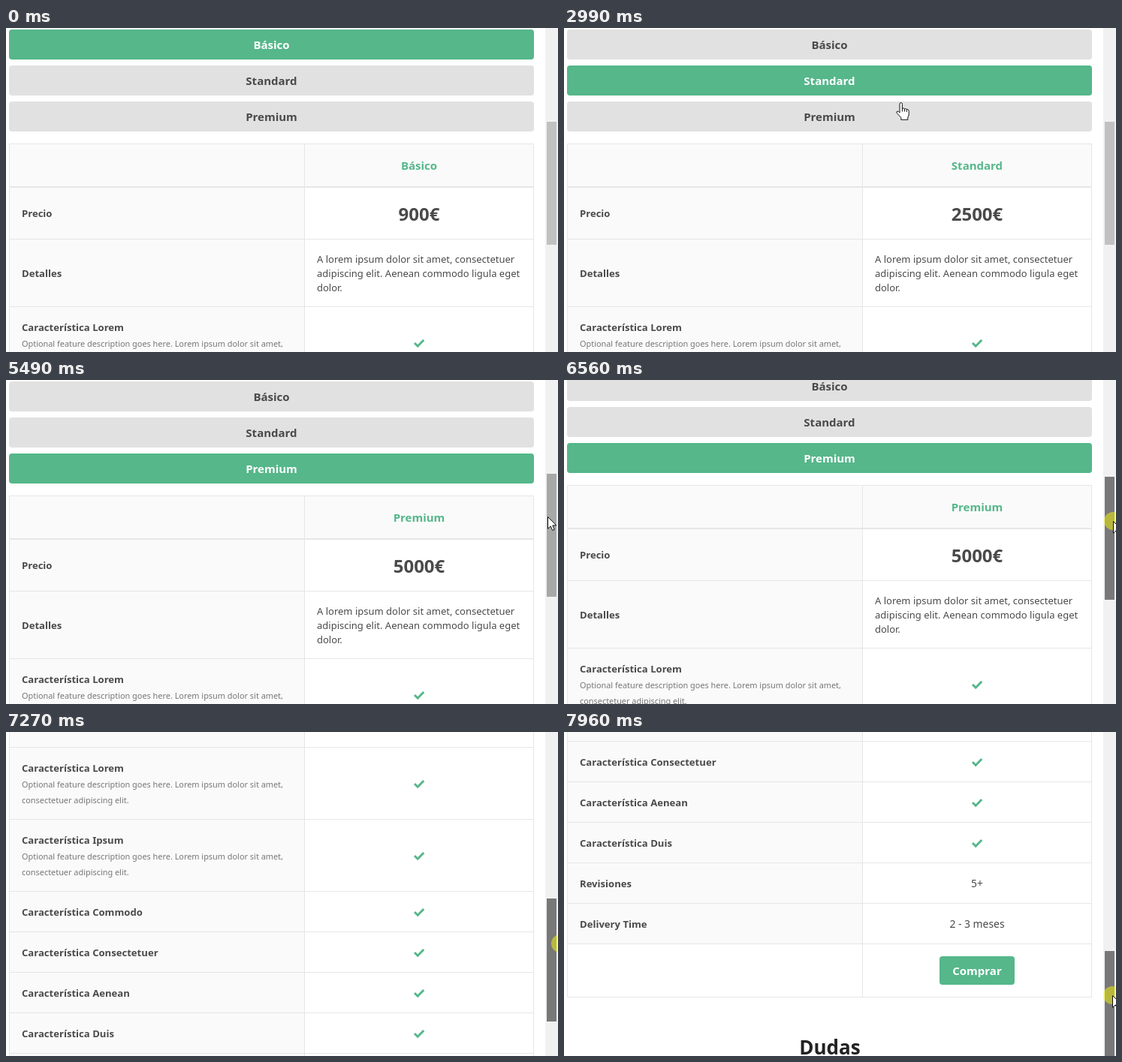
An HTML page for the animation above (8000 ms loop, 735x432 px).

```html
<!DOCTYPE html>
<html lang="es">
<head>
<meta charset="utf-8">
<title>Planes</title>
<style>
  html, body { margin: 0; width: 100%; height: 100%; overflow: hidden; background: #fff; }
  svg { display: block; font-family: "Noto Sans", sans-serif; fill: #4a4a4a; }
  .b { font-weight: 700; }
  .mid { text-anchor: middle; }
  .tab { font-size: 15px; }
  .price { font-size: 24px; }
  .row { font-size: 13.1px; }
  .text { font-size: 13px; }
  .value { font-size: 13.9px; }
  .note { font-size: 10.9px; fill: #777; }
  .green { fill: #55b78a; }
  .white { fill: #fff; }
  .title { font-size: 26px; fill: #222; }
  .cell { fill: #fafafa; }
  .line { fill: #e6e6e6; }
  .tick { fill: none; stroke: #55b78a; stroke-width: 3; }
  .cursor { fill: #fff; stroke: #111; stroke-width: 1; stroke-linejoin: round; }
</style>
</head>
<body>
<svg width="735" height="432" viewBox="0 0 735 432">
  <g id="page"></g>
  <rect x="718" width="17" height="432" fill="#f1f1f1"/>
  <rect id="thumb" x="720" width="13" height="164"/>
  <g id="pointer">
    <circle id="press" r="12" fill="#ff0" fill-opacity=".48"/>
    <path id="arrow" class="cursor" d="M.5 .5V16.3L4.2 12.8 6.7 18.5 9.2 17.4 6.8 11.9H11.9Z"/>
    <g id="hand" class="cursor" transform="translate(-6)">
      <path d="M5 14V2.3a1.7 1.7 0 0 1 3.4 0V8.2q1.7-1 3 .6 1.6-.8 2.8.7 2.6-.6 3 1.9V16q0 2.2-1.4 4v3.3H6.8v-2.8L1.2 14.4q-1-1.9.8-2.4 1.6-.2 3 2z"/>
      <path fill="none" d="M8.4 8v4.5M11.4 9v3.5M14.2 10v3"/>
    </g>
  </g>
</svg>
<script>
const LOOP = 8000;
const $ = id => document.getElementById(id);
const page = $("page");

function add(tag, attrs, label) {
  const el = document.createElementNS("http://www.w3.org/2000/svg", tag);
  for (const k in attrs) el.setAttribute(k, attrs[k]);
  if (label) el.textContent = label;
  return page.appendChild(el);
}
const rect = (x, y, width, height, cls, rx = 0) =>
  add("rect", { x, y, width, height, rx, class: cls });
const text = (x, y, cls, label) => add("text", { x, y, class: cls }, label);
const tick = y => add("path", { class: "tick", d: `M544 ${y}l4.2 4.2 8-8.2` });

// Plan buttons
const plans = [["Básico", "900€"], ["Standard", "2500€"], ["Premium", "5000€"]];
const tabs = plans.map(([name], i) => ({
  box: rect(4, 2 + 48 * i, 699, 40, "", 4),
  label: text(353.5, 28 + 48 * i, "b mid tab", name)
}));

// Table
rect(4, 154, 699, 58, "cell");
rect(4, 212, 393, 675, "cell");
for (const y of [154, 281, 371, 467, 563, 617, 671, 725, 779, 833, 887, 958]) rect(4, y, 699, 1, "line");
rect(4, 211, 699, 2, "line");
for (const x of [4, 397, 702]) rect(x, 154, 1, 805, "line");

const planName = text(550, 189, "b mid tab green", "");
const planPrice = text(550, 257, "b mid price", "");
text(21, 252, "b row", "Precio");
text(21, 332, "b row", "Detalles");
["A lorem ipsum dolor sit amet, consectetuer", "adipiscing elit. Aenean commodo ligula eget", "dolor."]
  .forEach((s, i) => text(414, 313 + 19 * i, "text", s));
["Lorem", "Ipsum"].forEach((s, i) => {
  const y = 404 + 96 * i;
  text(21, y, "b row", "Característica " + s);
  text(21, y + 21, "note", "Optional feature description goes here. Lorem ipsum dolor sit amet,");
  text(21, y + 42, "note", "consectetuer adipiscing elit.");
  tick(y + 16);
});
["Commodo", "Consectetuer", "Aenean", "Duis"].forEach((s, i) => {
  text(21, 596 + 54 * i, "b row", "Característica " + s);
  tick(591 + 54 * i);
});
[["Revisiones", "5+"], ["Delivery Time", "2 - 3 meses"]].forEach(([name, value], i) => {
  text(21, 812 + 54 * i, "b row", name);
  text(550, 812 + 54 * i, "mid value", value);
});
rect(500, 904, 100, 38, "green", 4);
text(550, 929, "b mid tab white", "Comprar");
text(354, 1035, "b mid title", "Dudas");

// Pointer moves: start, end, steps, target x, y
const moves = [
  [780, 1580, 11, 455, 67], [2830, 3070, 4, 447, 105],
  [3380, 3450, 2, 447, 110], [4760, 5550, 11, 728, 184]
];
// Drag knots: time, scroll, speed, pointer x, grip below thumb top
const drag = [
  [6430, 0, .03, 728, 59], [6560, 14, .17, 731, 59], [6960, 145, .52, 736, 63],
  [7270, 351, .6, 738, 60], [7960, 605, .25, 730, 59]
];
// Held steps while dragging: time, steps until the next entry
const beats = [[6430, 2], [6560, 1], [6660, 4], [6960, 4], [7270, 9], [7960, 1]];

const ease = p => p * p * (3 - 2 * p);
const mix = (a, b, p) => a + (b - a) * p;
const segment = (list, t) => {
  let i = 0;
  while (i < list.length - 2 && t >= list[i + 1][0]) i++;
  return [list[i], list[i + 1]];
};

function pointerAt(t) {
  let x = 641, y = 402;
  for (const [start, end, steps, tx, ty] of moves) {
    if (t < start) break;
    const step = Math.floor((t - start) / (end - start) * (steps - 1) + 1e-6) + 1;
    const p = ease(Math.min(1, step / steps));
    x = mix(x, tx, p);
    y = mix(y, ty, p);
  }
  return [x, y];
}

function held(t) {
  const [a, b] = segment(beats, t), size = (b[0] - a[0]) / a[1];
  return Math.min(b[0], a[0] + Math.floor((t - a[0]) / size + 1e-6) * size);
}

function dragAt(t) {
  const [a, b] = segment(drag, t), d = b[0] - a[0], p = (t - a[0]) / d, q = 1 - p;
  const scroll = mix(a[1], b[1], ease(p)) + d * p * q * (a[2] * q - b[2] * p);
  return [Math.round(scroll), mix(a[3], b[3], p), mix(a[4], b[4], p)];
}

let shown = -1;
function choose(n) {
  if (n === shown) return;
  shown = n;
  tabs.forEach(({ box, label }, i) => {
    box.setAttribute("fill", i === n ? "#55b78a" : "#e1e1e1");
    label.setAttribute("fill", i === n ? "#fff" : "#4a4a4a");
  });
  [planName.textContent, planPrice.textContent] = plans[n];
}

const show = (id, on) => $(id).setAttribute("visibility", on ? "visible" : "hidden");

function draw(t) {
  const dragging = t >= 6430;
  let scroll = 0, grip = 0, [x, y] = pointerAt(t);
  if (dragging) [scroll, x, grip] = dragAt(held(t));
  const top = Math.round(125 + scroll * .276);
  if (dragging) y = top + grip;
  x = Math.round(x);
  y = Math.round(y);

  choose(t < 2280 ? 0 : t < 3850 ? 1 : 2);
  page.setAttribute("transform", `translate(0 ${-scroll})`);
  $("thumb").setAttribute("y", top);
  $("thumb").setAttribute("fill", dragging ? "#787878" : x >= 720 ? "#a8a8a8" : "#c1c1c1");

  const seen = t >= 780;
  const onTab = !dragging && x < 703 && y >= 2 && y < 138 && (y - 2) % 48 < 40;
  $("pointer").setAttribute("transform", `translate(${x} ${y})`);
  show("hand", seen && onTab);
  show("arrow", seen && !onTab);
  show("press", dragging || t >= 2030 && t < 2200 || t >= 3690 && t < 3850);
}

const origin = performance.now();
function frame() {
  draw((performance.now() - origin) % LOOP);
  requestAnimationFrame(frame);
}
frame();
</script>
</body>
</html>
```
